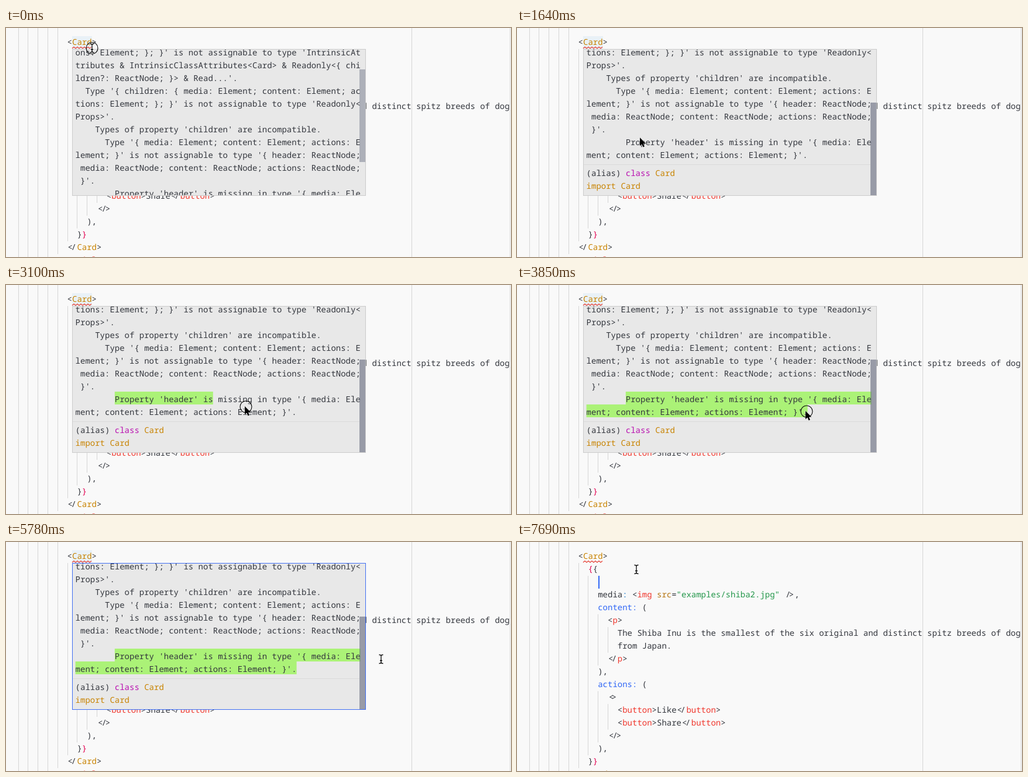
Animation, 863 px wide and 393 px high, one loop 8000 ms. Source, as an HTML page:

```html
<!DOCTYPE html>
<html lang="en">
<head>
<meta charset="utf-8">
<title>Editor hover</title>
<style>
html, body { margin: 0; width: 100%; height: 100%; overflow: hidden; background: #f9f9f9; }
svg { display: block; }
text { font: 14px "Noto Sans Mono", "DejaVu Sans Mono", monospace; white-space: pre; text-rendering: geometricPrecision; }
</style>
</head>
<body>
<svg id="stage" width="863" height="393" viewBox="0 0 863 393"></svg>
<script>
const LOOP = 8000, CW = 8.4, LH = 22, CODE_X = 104.6, TIP_X = 118.6;
const INK = {
  d: '#33363d', // plain
  y: '#c88300', // component
  r: '#f0372d', // tag
  b: '#2f66f6', // key
  o: '#1f78c8', // operator
  a: '#b5740f', // attribute
  g: '#23974a', // string
  k: '#b90fb0', // keyword
  p: '#e2004f'  // outer brace
};
// Horizontal nudges that draw paired symbols closer together
const LIGATURES = { '</>': [2, 0, -2], '</': [1, -1.5], '/>': [1.5, -1], '<>': [2, -2] };

const CODE = [
  [0, ''],
  [0, '<~yCard~d>'],
  [2, '~p{~d{'],
  [4, 'media~o:~d <~rimg~d ~asrc~d=~g"examples/shiba2.jpg"~d />,'],
  [4, '~bcontent:~d ('],
  [6, '<~rp~d>'],
  [8, 'The Shiba Inu is the smallest of the six original and distinct spitz breeds of dog'],
  [8, 'from Japan.'],
  [6, '</~rp~d>'],
  [4, '),'],
  [4, '~bactions:~d ('],
  [6, '<>'],
  [8, '<~rbutton~d>Like</~rbutton~d>'],
  [8, '<~rbutton~d>Share</~rbutton~d>'],
  [6, '</>'],
  [4, '),'],
  [2, '}~p}'],
  [0, '</~yCard~d>'],
  [-2, '</~rarticle~d>']
];

const MESSAGE = [
  "ons: Element; }; }' is not assignable to type 'IntrinsicAt",
  "tributes & IntrinsicClassAttributes<Card> & Readonly<{ chi",
  "ldren?: ReactNode; }> & Read...'.",
  "  Type '{ children: { media: Element; content: Element; ac",
  "tions: Element; }; }' is not assignable to type 'Readonly<",
  "Props>'.",
  "    Types of property 'children' are incompatible.",
  "      Type '{ media: Element; content: Element; actions: E",
  "lement; }' is not assignable to type '{ header: ReactNode;",
  " media: ReactNode; content: ReactNode; actions: ReactNode;",
  " }'.",
  "        Property 'header' is missing in type '{ media: Ele",
  "ment; content: Element; actions: Element; }'."
];

// time, x, y, pointer, button held, selected characters
const STEPS = [
  [0, 147, 34.5, 'beam', 1, 0],
  [150, 274.5, 162, 'arrow', 0, 0],
  [1350, 268, 166, 'arrow', 0, 0],
  [1500, 240, 176, 'arrow', 0, 0],
  [1640, 210, 188, 'arrow', 0, 0],
  [1780, 194, 193, 'arrow', 0, 0],
  [1930, 187, 194, 'arrow', 0, 0],
  [2070, 184, 194, 'arrow', 0, 0],
  [2520, 233, 194, 'arrow', 1, 2],
  [2670, 296, 197, 'arrow', 1, 6],
  [2820, 352, 202, 'arrow', 1, 13],
  [2960, 408, 208, 'arrow', 1, 20],
  [3110, 450, 214, 'arrow', 1, 84],
  [3260, 476, 217, 'arrow', 1, 89],
  [3400, 485, 217, 'arrow', 1, 94],
  [3700, 489, 216, 'arrow', 1, 94],
  [3850, 493, 216, 'arrow', 1, 95],
  [4290, 493, 216, 'arrow', 0, 95],
  [5480, 617, 197, 'beam', 0, 95],
  [5630, 635, 195, 'beam', 0, 95],
  [5780, 641, 201, 'beam', 0, 95],
  [5930, 340, 200, 'beam', 0, 0],
  [6070, 292, 146, 'beam', 0, 0],
  [6220, 276, 112, 'beam', 0, 0],
  [6370, 258, 88, 'beam', 0, 0],
  [6510, 236, 70, 'beam', 0, 0],
  [6660, 220, 59, 'beam', 0, 0],
  [6810, 210, 51, 'beam', 0, 0],
  [6960, 204, 47, 'beam', 0, 0]
];

function el(parent, tag, attrs = {}) {
  const node = document.createElementNS('http://www.w3.org/2000/svg', tag);
  for (const name in attrs) node.setAttribute(name, attrs[name]);
  return parent.appendChild(node);
}
const rect = (parent, x, y, width, height, fill, more) =>
  el(parent, 'rect', { x, y, width, height, fill, ...more });
const show = (node, on) => node.setAttribute('visibility', on ? 'visible' : 'hidden');
const move = (node, x, y) => node.setAttribute('transform', `translate(${x} ${y})`);

function write(parent, x, y, markup) {
  const put = (s, px, fill) => el(parent, 'text', { x: px.toFixed(2), y, fill }).textContent = s;
  let ink = INK.d;
  markup.split(/~(\w)/).forEach((part, i) => {
    if (i % 2) { ink = INK[part]; return; }
    for (const run of part.split(/(<\/>|<\/|\/>|<>)/)) {
      const nudge = LIGATURES[run];
      if (nudge) nudge.forEach((n, j) => put(run[j], x + j * CW + n, ink));
      else if (run) put(run, x, ink);
      x += run.length * CW;
    }
  });
}

function codeRow(parent, row, indent, markup) {
  const top = 14 + row * LH;
  for (let c = -10; c < indent; c += 2)
    rect(parent, Math.round(CODE_X + c * CW), top, 1, LH, '#d5d5d5');
  write(parent, CODE_X + indent * CW, top + 15, markup);
}

const stage = document.getElementById('stage');
rect(stage, 0, 0, 863, 393, '#f9f9f9');
const trail = rect(stage, 335, 191, 312, 20, '#f1f1f1');
const hoverMark = rect(stage, 113, 14, 34, 22, '#e9f1f7');
for (const x of [693, 861]) rect(stage, x, 0, 1, 393, '#d5d5d5');

// Editor
const newLine = el(stage, 'g');
codeRow(newLine, 2, 4, '');
const above = el(stage, 'g'), below = el(stage, 'g');
CODE.forEach(([indent, markup], i) => codeRow(i < 3 ? above : below, i - 1, indent, markup));

let wave = 'M113 35';
for (let i = 1; i < 12; i++) wave += `L${113 + i * 3} ${i % 2 ? 32.5 : 35}`;
el(stage, 'path', { d: wave, fill: 'none', stroke: '#e5382c', 'stroke-width': 1.1 });

const braces = el(stage, 'g', { fill: 'none', stroke: '#c6c6c6' });
for (const [x, y] of [[130.5, 36.5], [122.5, 344.5]]) rect(braces, x, y, 8, 21, 'none');
const caret = rect(stage, 139, 36, 2, LH, '#2f66f6');

// Tooltip
const tip = el(stage, 'g');
const frame = rect(tip, 113.5, 36.5, 501, 251, '#e8e8e8');
const view = el(tip, 'svg', { x: 114, y: 37, width: 500, height: 250, viewBox: '114 37 500 250' });
const page = el(view, 'g');
const marks = [TIP_X + 8 * CW, TIP_X].map((x, i) => rect(page, x, 271 + i * LH, 0, LH, '#abf277'));
MESSAGE.forEach((line, i) => write(page, TIP_X, 47 + i * LH, line));
rect(page, 114, 322, 490, 1, '#dadada');
write(page, TIP_X, 342, '(alias) ~kclass ~yCard');
write(page, TIP_X, 364, '~yimport Card');
const thumb = rect(view, 604, 71, 10, 159, '#646a7e');

// Pointer
const pointer = el(stage, 'g');
const shapes = { arrow: el(pointer, 'g'), beam: el(pointer, 'g') };
el(shapes.arrow, 'path', {
  d: 'M0 0V14.4L3.3 11.3L5.5 16.4L8 15.3L5.8 10.4H10.3Z',
  fill: '#000', stroke: '#fff', 'stroke-width': 1, 'paint-order': 'stroke'
});
for (const [stroke, width] of [['#fff', 3], ['#000', 1.3]])
  el(shapes.beam, 'path', {
    d: 'M-3.5 -7.5Q0 -7.5 0 -5.5Q0 -7.5 3.5 -7.5M0 -5.5V5.5M-3.5 7.5Q0 7.5 0 5.5Q0 7.5 3.5 7.5M-2 2.5H2',
    fill: 'none', stroke, 'stroke-width': width
  });
const ring = el(pointer, 'circle', { r: 10, fill: 'none', stroke: '#000', 'stroke-width': 1.1 });

function draw(t) {
  const [, x, y, shape, held, count] = STEPS.findLast(s => s[0] <= t);
  const scrolled = t >= 600, open = t < 5930, focused = t >= 4290, entered = t >= 7550;

  move(pointer, x, y);
  for (const name in shapes) show(shapes[name], name === shape);
  show(ring, held);
  move(ring, shape === 'arrow' ? 2 : 0, shape === 'arrow' ? 1 : 0);

  show(tip, open);
  show(hoverMark, open);
  frame.setAttribute('stroke', focused ? '#3f6df2' : '#cbcbcb');
  move(page, 0, scrolled ? -4 * LH : 0);
  thumb.setAttribute('y', scrolled ? 128 : 71);
  thumb.setAttribute('fill-opacity', t < 150 ? 0.45 : 0.6);
  marks[0].setAttribute('width', Math.min(count, 50) * CW);
  marks[1].setAttribute('width', Math.max(count - 50, 0) * CW);

  show(trail, !open && t < 6810);
  show(newLine, entered);
  move(below, 0, entered ? LH : 0);
  show(caret, t >= 7100);
  caret.setAttribute('y', entered ? 58 : 36);
  show(braces, t >= 7100 && !entered);
}

const start = performance.now();
function tick() {
  draw((performance.now() - start) % LOOP);
  requestAnimationFrame(tick);
}
tick();
</script>
</body>
</html>
```
